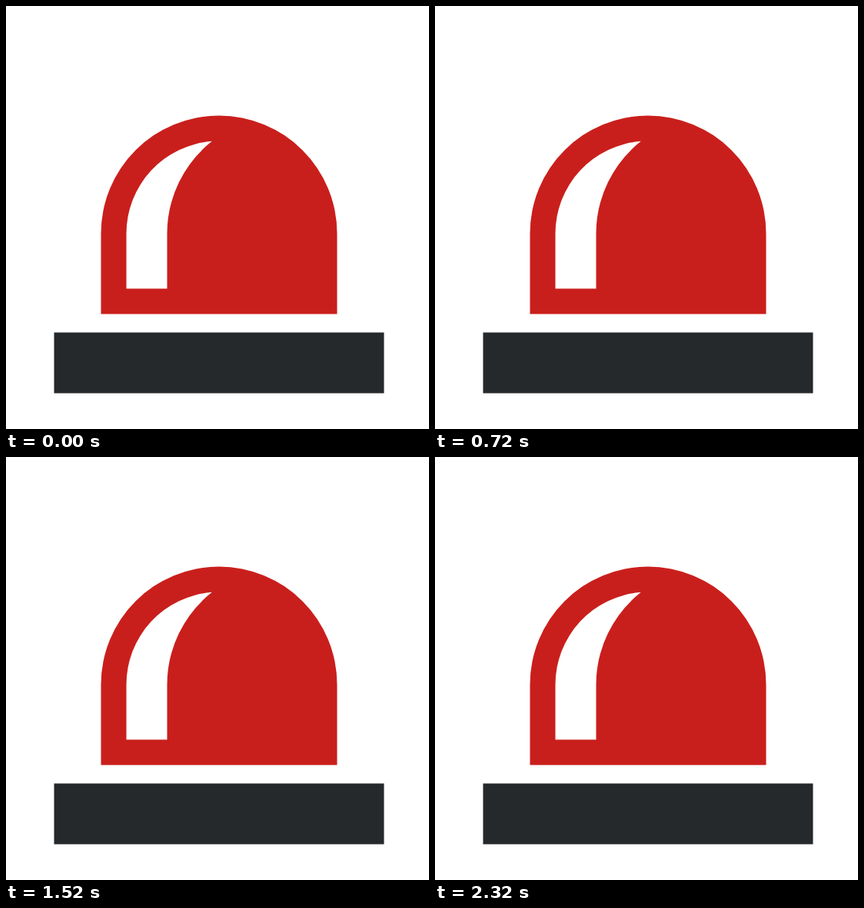
An HTML page that plays this animation: 550x550 px, repeating every 2.4 s.

```html
<!DOCTYPE html>
<html lang="en">
<head>
<meta charset="utf-8">
<title>Flashing siren</title>
<style>
  html, body { margin: 0; width: 100%; height: 100%; overflow: hidden; background: #fff; }
  svg { display: block; width: 100%; height: 100%; }
</style>
</head>
<body>
<svg viewBox="0 0 550 550">
  <path fill="#c91f1c" d="M123.5 400.5V296a153.5 153.5 0 0 1 307 0V400.5Z"/>
  <path fill="#26292c" d="M62.5 424.5H491.5V503.5H62.5Z"/>
  <path id="shine" fill="#fff" d="M156.5 367.5V296A120.5 120.5 0 0 1 267.8 175.85A153 153 0 0 0 209.5 296V367.5Z"/>
  <path id="rays" fill="none" stroke="#c91f1c" stroke-width="33" stroke-linecap="round"
    d="M37.5 254L88 263M120.5 110L153.5 149.5M277 53V104.5M433.5 110L400.5 149.5M516.5 254L466 263"/>
</svg>
<script>
  const LOOP = 2400, HOLD = 400, LEAD = 80;
  const shine = document.getElementById('shine');
  const rays = document.getElementById('rays');

  function draw(now) {
    const lit = Math.floor((now % LOOP + LEAD) / HOLD) % 2 === 1;
    rays.setAttribute('visibility', lit ? 'visible' : 'hidden');
    // The lit pose mirrors the highlight about the dome's axis, x = 277.
    shine.setAttribute('transform', lit ? 'matrix(-1 0 0 1 554 0)' : '');
  }

  const start = performance.now();
  function tick() {
    draw(performance.now() - start);
    requestAnimationFrame(tick);
  }
  tick();
</script>
</body>
</html>
```
